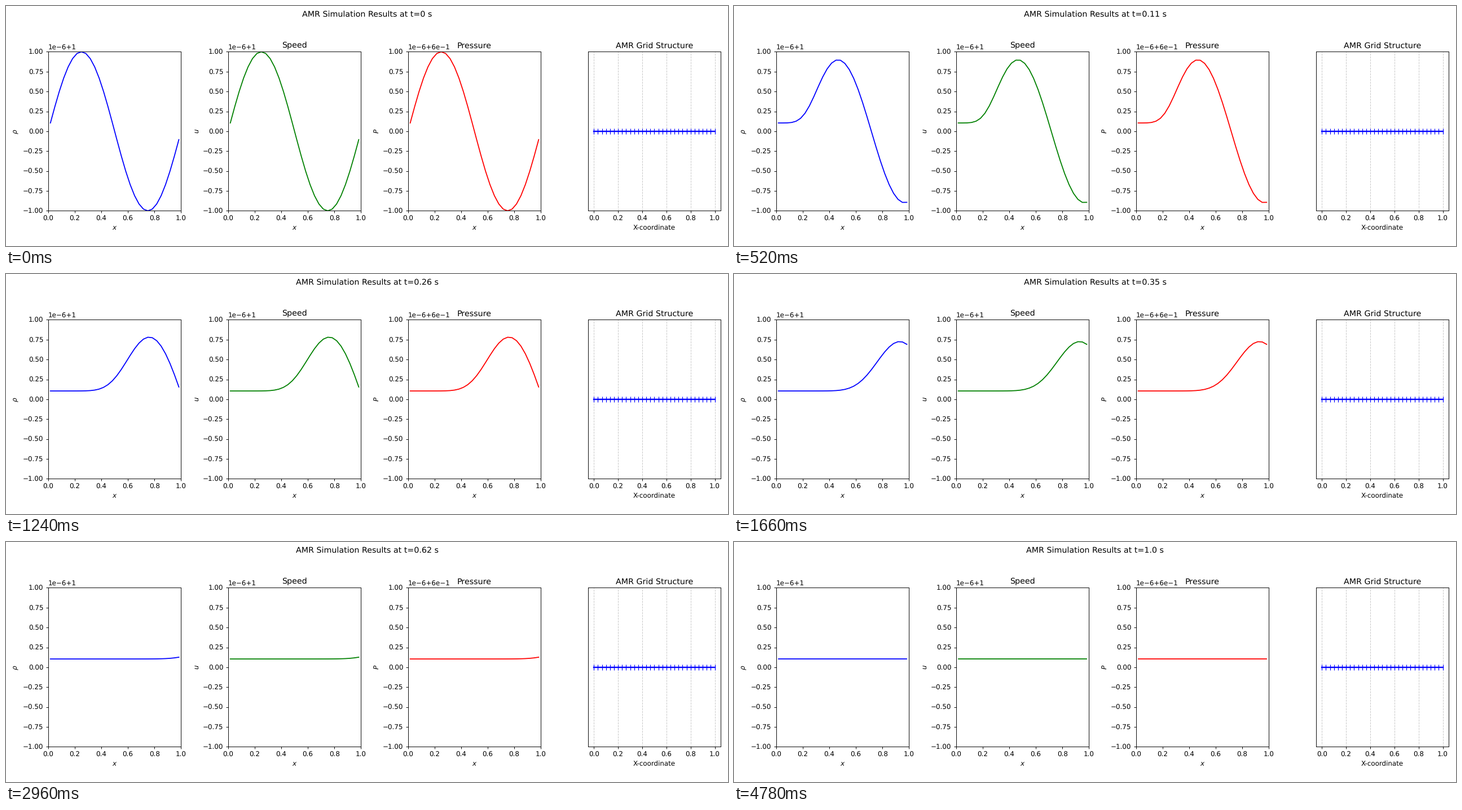
Animation of 1280x427 px, one loop 4.82 s. Source, as a matplotlib script:

```python
import numpy as np
import matplotlib.pyplot as plt
from matplotlib.animation import FuncAnimation

W, H = 1280, 427
DPI = W / 15
CELLS, STEPS = 30, 240
COURANT = 0.25
DT = (1 - 1e-6) / STEPS

plt.rcParams["font.family"] = "DejaVu Sans"


def simulate():
    """First-order upwind advection with a zero-gradient inflow."""
    x = (np.arange(CELLS) + 0.5) / CELLS
    states = [np.sin(2 * np.pi * x)]
    for _ in range(STEPS):
        q = states[-1]
        states.append(q - COURANT * np.diff(q, prepend=q[0]))
    return x, states


def add_curve(ax, label, title, offset, color):
    ax.set(xlim=(0, 1), ylim=(-1, 1), yticks=np.linspace(-1, 1, 9),
           xlabel="$x$", ylabel=label)
    ax.set_title(title, y=1.0)
    ax.annotate(offset.replace("-", "\N{MINUS SIGN}"), (0, 1), (0, 3),
                xycoords="axes fraction", textcoords="offset points",
                va="baseline")
    return ax.plot(x, states[0], color=color)[0]


def add_grid_panel(ax):
    edges = np.linspace(0, 1, CELLS + 1)
    ax.plot(edges, 0 * edges, "b|-", lw=2, ms=8)
    ax.set(xlim=(-0.05, 1.05), ylim=(-1, 1), yticks=[], xlabel="X-coordinate")
    ax.set_title("AMR Grid Structure", y=1.0)
    ax.grid(True, axis="x", linestyle="--", alpha=0.7)


def title_at(step):
    time = round(step * DT, 2) if step else 0
    return f"AMR Simulation Results at t={time} s"


x, states = simulate()
fig, axes = plt.subplots(1, 4, figsize=(15, 5), dpi=100)
heading = fig.suptitle(title_at(0))

panels = [
    (r"$\rho$", "", "1e-6+1", "b"),
    ("$u$", "Speed", "1e-6+1", "g"),
    ("$P$", "Pressure", "1e-6+6e-1", "r"),
]
curves = [add_curve(ax, *spec) for ax, spec in zip(axes, panels)]
add_grid_panel(axes[3])

# Lay out at 100 dpi, then scale the figure to the stage size.
fig.tight_layout(rect=[0, 0.03, 1, 0.95])
fig.set_dpi(DPI)
fig.set_size_inches((W + 0.01) / DPI, (H + 0.01) / DPI)
plt.rcParams["text.hinting"] = "none"


def update(step):
    heading.set_text(title_at(step))
    for curve in curves:
        curve.set_ydata(states[step])
    return [heading, *curves]


anim = FuncAnimation(fig, update, frames=STEPS + 1, interval=20,
                     repeat=True, repeat_delay=0, blit=False)
plt.show()
```
